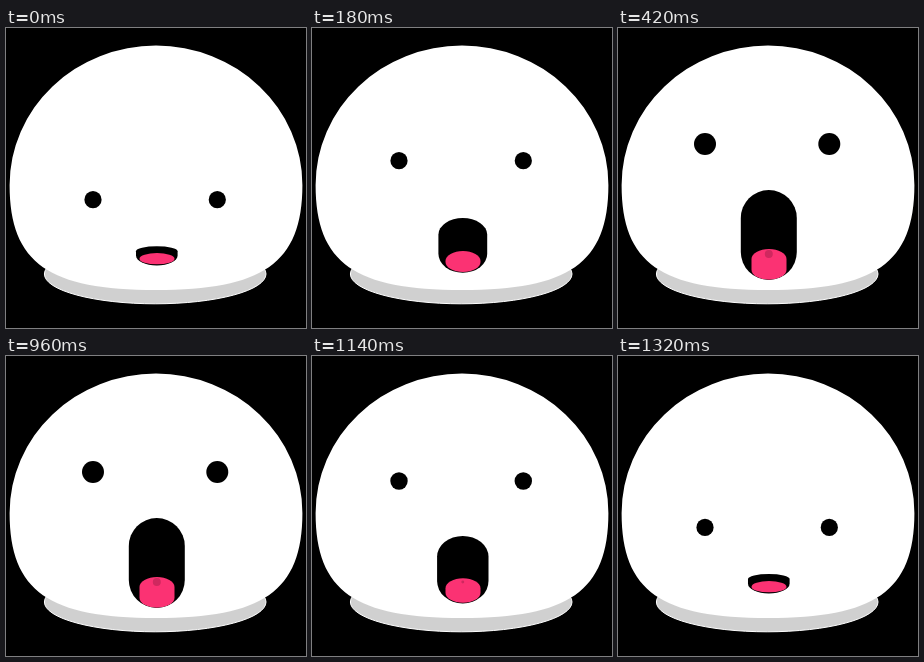
Recreate the animation shown at these times as an HTML page with a canvas. Size 300x300 px, loop 1.35 s.

```html
<!DOCTYPE html>
<html lang="en">
<head>
<meta charset="utf-8">
<title>Surprised blob</title>
<style>
html, body { margin: 0; width: 100%; height: 100%; overflow: hidden; background: #000; }
canvas { display: block; width: 300px; height: 300px; }
</style>
</head>
<body>
<canvas id="stage" width="300" height="300"></canvas>
<script>
const ctx = document.getElementById('stage').getContext('2d');
const LOOP = 1350, STEP = 30, MOVE = 420;

const lerp = (a, b, p) => a + (b - a) * p;

// S-shaped easing; reaches one half where u / (1 - u) equals mid
function ease(u, mid, power) {
  const a = u ** power, b = (mid * (1 - u)) ** power;
  return a / (a + b);
}

function oval(x, y, rx, ry, color) {
  ctx.fillStyle = color;
  ctx.beginPath();
  ctx.ellipse(x, y, rx, ry, 0, 0, Math.PI * 2);
  ctx.fill();
}

// Box whose upper and lower ends are half ovals
function capsule(x, half, top, bottom, up, low, color) {
  ctx.fillStyle = color;
  ctx.beginPath();
  ctx.ellipse(x, top + up, half, up, 0, Math.PI, Math.PI * 2);
  ctx.ellipse(x, bottom - low, half, low, 0, 0, Math.PI);
  ctx.closePath();
  ctx.fill();
}

function drawBody() {
  oval(149.2, 246, 110.8, 29.8, '#d0d0d0');
  ctx.strokeStyle = '#fff';
  ctx.stroke();
  ctx.fillStyle = '#fff';
  ctx.beginPath();
  ctx.ellipse(150, 157, 146.4, 139.4, 0, Math.PI, Math.PI * 2);
  ctx.bezierCurveTo(296.4, 236, 256, 262, 150, 262);
  ctx.bezierCurveTo(44, 262, 3.6, 236, 3.6, 157);
  ctx.fill();
}

function drawEyes(lift, open) {
  const r = lerp(8.6, 11, open ** 8);
  for (const x of [87, 211.3]) oval(x, lerp(171.7, 116, lift), r, r, '#000');
}

function drawMouth(open) {
  const at = (shut, wide) => lerp(shut, wide, open);
  ctx.save();
  capsule(150.8, at(20.8, 28), at(218.2, 162), at(237.5, 252), at(5, 28), at(10, 28), '#000');
  ctx.clip();
  const top = at(225, 221), bottom = at(236.3, 251.7);
  const round = Math.min(10, (bottom - top) / 2);
  capsule(151, 17.5, top, bottom, round, round, '#fb3273');
  ctx.clip();
  const spot = 4 * Math.max(0, 2 * open - 1);
  oval(150.8, 226, spot, spot, '#cf285f');
  ctx.restore();
}

function draw(time) {
  const t = Math.floor(time % LOOP / STEP) * STEP;
  const u = Math.min(t, LOOP - t, MOVE) / MOVE;
  const lift = ease(u, 0.55, 2.75), open = ease(u, 0.75, 2.65);
  ctx.fillStyle = '#000';
  ctx.fillRect(0, 0, 300, 300);
  drawBody();
  drawEyes(lift, open);
  drawMouth(open);
}

const start = performance.now();
function tick() {
  draw(performance.now() - start);
  requestAnimationFrame(tick);
}
tick();
</script>
</body>
</html>
```
